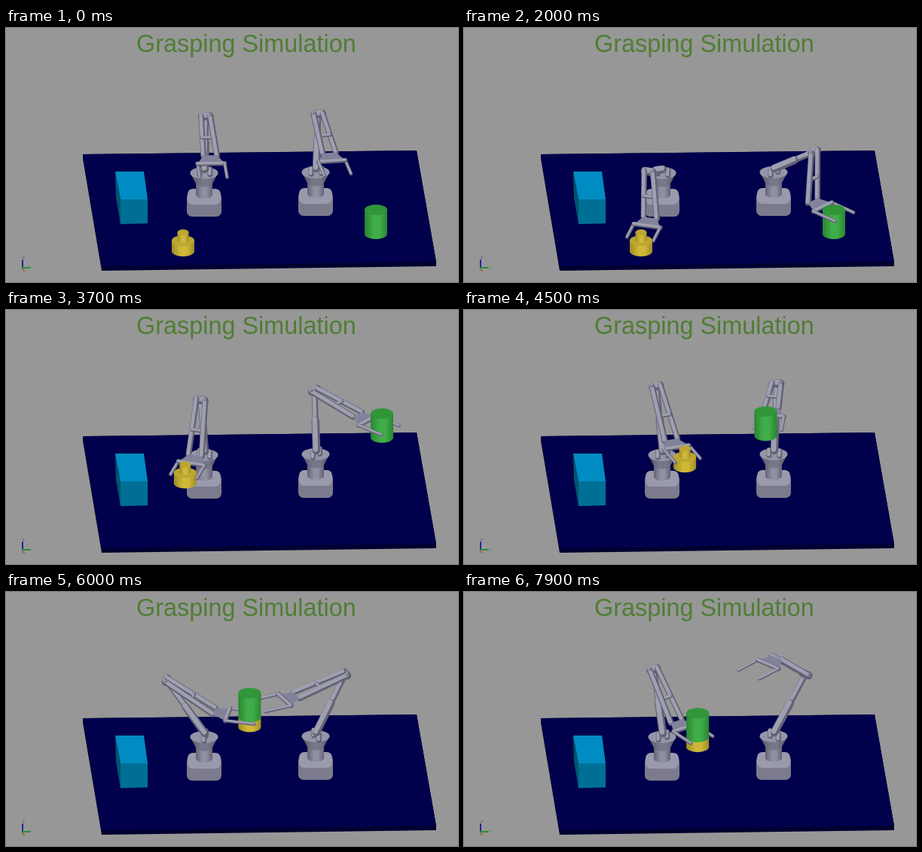
An HTML page with a canvas for the animation above (8 s loop, 600 by 338 pixels).

```html
<!DOCTYPE html>
<html lang="en">
<head>
<meta charset="utf-8">
<title>Grasping Simulation</title>
<style>
  html, body { margin: 0; width: 600px; height: 338px; overflow: hidden; background: #979797; }
  canvas { position: absolute; left: 0; top: 0; }
  h1 { position: absolute; left: 173px; top: 3px; margin: 0; white-space: nowrap;
       font: 32.4px/37px "Liberation Sans", Arial, sans-serif; color: #4f7e34; }
</style>
</head>
<body>
<canvas width="600" height="338"></canvas>
<h1>Grasping Simulation</h1>
<script>
const c = document.querySelector('canvas').getContext('2d');
const LOOP = 8000, GRASP = 2900, STACK = 5300, RELEASE = 6000;
const UPPER = 90, FORE = 75, PALM = 18, FINGER = 39, GRIP = 48, HALF = 18;
const times = [0, 1200, GRASP, 3700, STACK, RELEASE, 6900, 7900];

// Joint angles in degrees at those times; the gripper always stays level
const left = {
  x: 263, y: 192,
  yaw: [90, 104, 110, 110, 25, 15, 3, 58],
  lean: [10, 43, 79, 13, -30, -35, -40, -13],
  pitch: [-16, -70, -113, -68, -35, -31, -26, -48]
};
const right = {
  x: 411, y: 191,
  yaw: [83, 48, 47, 45, 155, 156, 180, 135],
  lean: [8, 33, 68, -2, -32, -29, -37, -45],
  pitch: [-16, -70, -105, -7, 6, -12, 39, 39]
};
const yellowHome = [235, 290], greenHome = [491, 258];

const add = (a, b, k = 1) => [a[0] + b[0] * k, a[1] + b[1] * k];
const mix = (a, b, k) => add(a, add(b, a, -1), k);
const ease = u => { u = Math.max(0, Math.min(1, u)); return u * u * (3 - 2 * u); };

// Monotone cubic through the key angles, in radians
function angle(keys, t) {
  let i = 0;
  while (i < times.length - 2 && t >= times[i + 1]) i++;
  const h = times[i + 1] - times[i], u = Math.min(1, (t - times[i]) / h);
  const slope = j => (keys[j + 1] - keys[j]) / (times[j + 1] - times[j]) || 0;
  const tangent = j => {
    const a = slope(j - 1), b = slope(j);
    return a * b > 0 ? 2 * a * b / (a + b) * h : 0;
  };
  const d = keys[i + 1] - keys[i], m = tangent(i), n = tangent(i + 1);
  return (keys[i] + u * (m + u * (3 * d - 2 * m - n + u * (m + n - 2 * d)))) * Math.PI / 180;
}

// Screen positions of the joints: reach r, height z, sideways s
function joints(arm, t) {
  const yaw = angle(arm.yaw, t), lean = angle(arm.lean, t), pitch = angle(arm.pitch, t);
  const cos = Math.cos(yaw), sin = Math.sin(yaw);
  const at = (r, z, s) => {
    const x = r * cos - s * sin, y = r * sin + s * cos;
    return [arm.x + 1 + x + .08 * y, arm.y - 4 - .011 * x + .47 * y - .88 * z];
  };
  const er = UPPER * Math.sin(lean), ez = UPPER * Math.cos(lean);
  const wr = er + FORE * Math.cos(pitch), wz = ez + FORE * Math.sin(pitch);
  const near = cos >= 0 ? 1 : -1;
  return {
    near,
    shoulder: s => at(0, 0, s),
    elbow: s => at(er, ez, s),
    wrist: s => at(wr, wz, s),
    palm: s => at(wr + PALM, wz - 3, s),
    tip: s => at(wr + PALM + FINGER, wz - 3, s),
    grip: at(wr + GRIP, wz, 0)
  };
}

// A part rests at home, then keeps its offset from the gripper
function carried(arm, home, t) {
  if (t < GRASP) return home;
  return add(home, add(joints(arm, t).grip, joints(arm, GRASP).grip, -1));
}

function poly(fill, ...pts) {
  c.fillStyle = fill;
  c.beginPath();
  pts.forEach(p => c.lineTo(...p));
  c.fill();
}

function line(a, b, w, color) {
  c.strokeStyle = color;
  c.lineWidth = w;
  c.beginPath();
  c.moveTo(...a);
  c.lineTo(...b);
  c.stroke();
}

function rod(a, b, w) {
  const lift = [-w * .1, -w * .15];
  line(a, b, w, '#626272');
  line(add(a, lift), add(b, lift), w * .62, '#9f9fb2');
}

function oval([x, y], rx, ry, fill) {
  c.fillStyle = fill;
  c.beginPath();
  c.ellipse(x, y, rx, ry, 0, 0, 7);
  c.fill();
}

function cylinder(x, top, bottom, r, r2, ry, [edge, middle, cap]) {
  const g = c.createLinearGradient(x - r, 0, x + r, 0);
  g.addColorStop(0, edge);
  g.addColorStop(.4, middle);
  g.addColorStop(.65, middle);
  g.addColorStop(1, edge);
  oval([x, bottom], r2, ry * r2 / r, g);
  poly(g, [x - r, top], [x + r, top], [x + r2, bottom], [x - r2, bottom]);
  oval([x, top], r, ry, cap);
}

function base({ x, y }) {
  const block = (inset, top, h, fill) => {
    c.fillStyle = fill;
    c.beginPath();
    c.roundRect(x - 23 + inset, y + top, 46 - 2 * inset, h, 7);
    c.fill();
  };
  block(0, 26, 33, '#7b7b8d');
  block(1, 22, 21, '#9a9aad');
  cylinder(x, y + 12, y + 30, 11, 11, 5, ['#626272', '#9090a3', '#626272']);
  cylinder(x, y + 1, y + 15, 18.5, 11, 8, ['#555563', '#77778a', '#9595a8']);
}

function drawArm({ near, shoulder, elbow, wrist, palm, tip }) {
  for (const s of [-7 * near, 7 * near]) rod(shoulder(s), add(shoulder(s), [0, 7]), 7);
  rod(shoulder(0), elbow(0), 8);
  rod(shoulder(0), mix(shoulder(0), elbow(0), .5), 10.5);
  rod(elbow(-5), elbow(5), 11);
  const rail = s => [elbow(s * 6), wrist(s * 9)];
  const back = rail(-near), front = rail(near);
  rod(...back, 7.5);
  rod(mix(...back, .55), mix(...front, .55), 5);
  rod(...front, 8);
  oval(add(elbow(near * 6), [0, -1]), 2, 1.5, '#777789');
  poly('#82829a', wrist(-9), palm(-HALF), palm(HALF), wrist(9));
  rod(palm(-near * HALF), tip(-near * HALF), 4.5);
  rod(palm(-HALF), palm(HALF), 6);
}

function scene() {
  c.fillStyle = '#979797';
  c.fillRect(0, 0, 600, 338);
  poly('#000030', [102, 168], [545, 163], [571, 311], [571, 317], [127, 323], [102, 174]);
  poly('#00004c', [102, 168], [545, 163], [571, 311], [127, 317]);
  poly('#00546f', [145, 191], [152, 228], [152, 261], [146, 226]);
  poly('#008cc2', [145, 191], [183, 191], [188, 228], [152, 228]);
  poly('#006f96', [152, 228], [188, 228], [188, 260], [152, 261]);
  line([22, 309], [22, 319], 2, '#24249c');
  line([22, 319], [32, 319], 2, '#2c8c38');
  line([22, 321], [24, 323], 2, '#9a6a3c');
  c.font = '6px "Liberation Sans", sans-serif';
  c.fillStyle = '#4444a8';
  c.fillText('z', 22, 307);
  c.fillStyle = '#6f9a72';
  c.fillText('y', 34, 320);
}

function draw(now) {
  const t = now % LOOP;
  const arms = [left, right].map(arm => joints(arm, t));
  const yellow = carried(left, yellowHome, t);
  const stacked = ease((t - STACK) / (RELEASE - STACK));
  const green = mix(carried(right, greenHome, t), add(yellow, [0, -22]), stacked);
  const gold = ['#a08c28', '#cfb838', '#bda732'];
  c.lineCap = 'round';
  scene();
  [left, right].forEach(base);
  arms.forEach(drawArm);
  cylinder(yellow[0], yellow[1] - 7, yellow[1] + 7, 15, 15, 7, gold);
  cylinder(yellow[0], yellow[1] - 18, yellow[1] - 8, 7.5, 7.5, 4, gold);
  cylinder(green[0], green[1] - 16, green[1] + 16, 15, 15, 7, ['#2a8432', '#3fae48', '#31963a']);
  arms.forEach(({ near, palm, tip }) => rod(palm(near * HALF), tip(near * HALF), 4.5));
  requestAnimationFrame(draw);
}
requestAnimationFrame(draw);
</script>
</body>
</html>
```
